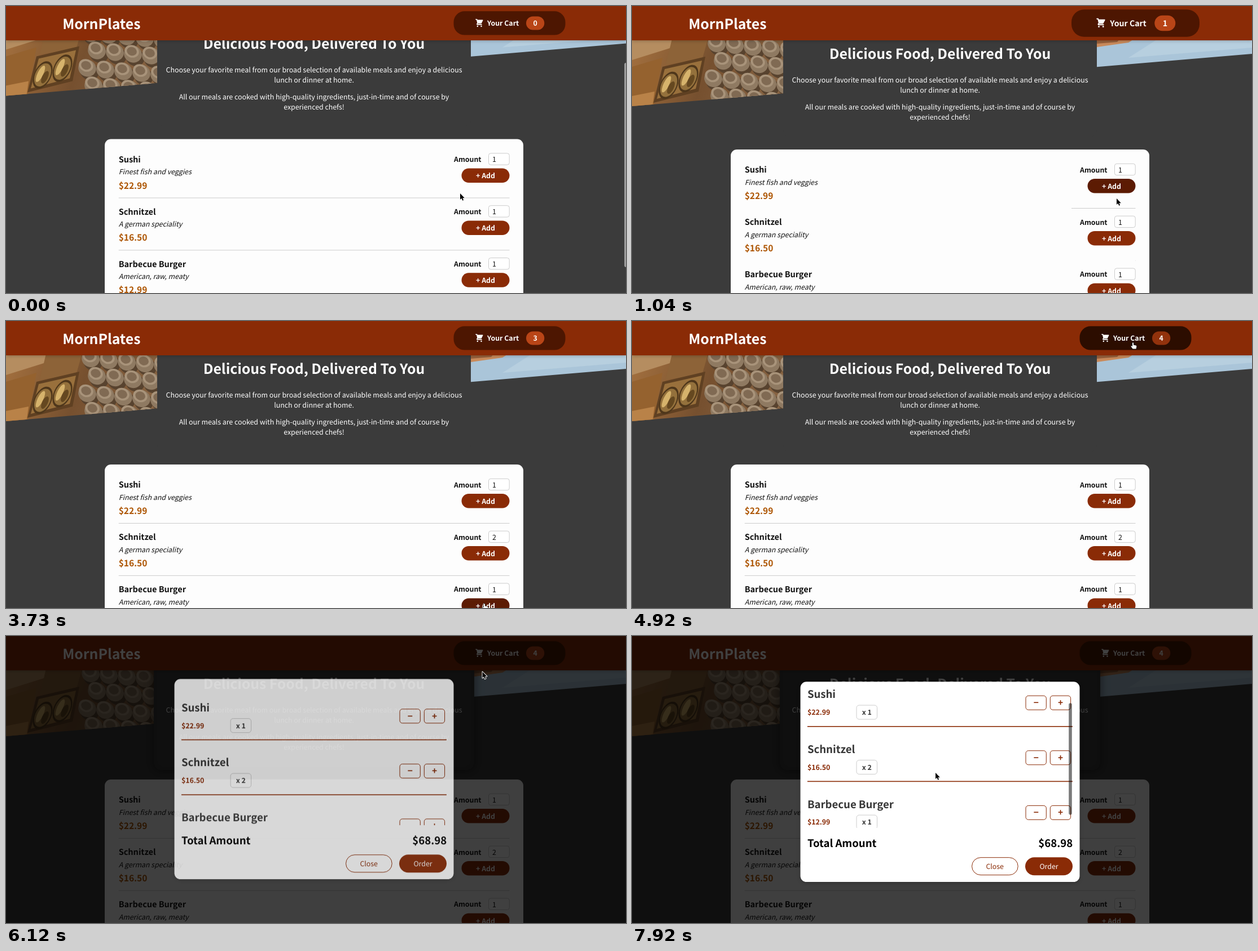
An HTML page with a canvas for the animation above (8000 ms loop, 1099 px wide and 510 px high).

```html
<!DOCTYPE html>
<html lang="en">
<head>
<meta charset="utf-8">
<title>Meal order</title>
<style>
  html, body { margin: 0; width: 100%; height: 100%; overflow: hidden; background: #3b3b3b; }
  canvas { display: block; width: 1099px; height: 510px; }
</style>
</head>
<body>
<canvas id="stage" width="1099" height="510"></canvas>
<script>
const W = 1099, H = 510, LOOP = 8000, TICK = 148.9;
const stage = document.getElementById('stage').getContext('2d');
const layer = new OffscreenCanvas(W, H).getContext('2d');
let ctx = stage;
const FAMILY = '"Noto Sans CJK JP", "Noto Sans CJK SC", "Noto Sans CJK", "Noto Sans", sans-serif';
const REM = 12.37;
const RUST = '#8a2b06', RUST_DARK = '#5c1b03', INK = '#363636', LINE = '#ccc';

const MEALS = [
  { name: 'Sushi', note: 'Finest fish and veggies', price: '$22.99', qty: 1 },
  { name: 'Schnitzel', note: 'A german speciality', price: '$16.50', qty: 2 },
  { name: 'Barbecue Burger', note: 'American, raw, meaty', price: '$12.99', qty: 1 }
];

const CART_ICON = new Path2D('M3 1a1 1 0 000 2h1.2l1.7 6.7-.9.9C3.7 11.8 4.6 14 6.4 14H15a1 1 0 000-2H6.4l1-1H14' +
  'a1 1 0 00.9-.55l3-6A1 1 0 0017 3H6.3L6 1.75A1 1 0 005 1zM16 16.5a1.5 1.5 0 11-3 0 1.5 1.5 0 013 0z' +
  'M6.5 18a1.5 1.5 0 100-3 1.5 1.5 0 000 3z');
const ARROW = new Path2D('M0 0V11L2.5 8.8L4.2 12.8L6.1 12L4.4 8.2H7.9Z');
const HAND = new Path2D('M-1 1Q0-.6 1 1V4.6L5.5 5.6Q6.6 6 6.4 7.4L5.6 11.6H-.4L-3.4 7.4Q-3.6 5.8-2.2 6.2L-1 7.2Z');

// Keyframes: [tick, value, ...]
const SCROLL = [[0, -18.5], [1, -14], [2, -4], [3, 0]];
const LIST = [[47, 0], [48, 4], [51, 4], [52, 15], [53, 28.5]];
const BUMP = [[0, 1], [.1, .9], [.3, 1.1], [.5, 1.146], [1, 1]];
const SLIDE = [[39, 0], [40, .417], [41, .87], [42, 1]];
const FADE = [[39, 0], [40, .18], [41, .8], [42, 1]];
const POINTER = [
  [1, 805, 333], [3, 822, 329], [5, 850, 320], [6, 851, 321], [7, 859, 342], [8, 867, 358],
  [12, 887, 387], [17, 887, 386], [19, 857, 408], [20, 851, 411], [22, 851, 411],
  [25, 848, 502], [29, 848, 502], [31, 868, 250], [33, 888, 38], [40, 889, 37],
  [42, 800, 90], [44, 610, 210], [46, 538, 243]
];

function track(keys, at, i = 1) {
  let a = keys[0];
  for (const b of keys) {
    if (at < b[0]) return b === a ? a[i] : a[i] + (b[i] - a[i]) * (at - a[0]) / (b[0] - a[0]);
    a = b;
  }
  return a[i];
}

const within = (v, a, b) => v >= a && v <= b;

function text(str, x, y, size, color, style = '', align = 'left') {
  ctx.font = `${style} ${size}px ${FAMILY}`;
  ctx.fillStyle = color;
  ctx.textAlign = align;
  ctx.fillText(str, x, y);
}

function box(x, y, w, h, r, fill, stroke, line = 1) {
  ctx.beginPath();
  ctx.roundRect(x, y, w, h, r);
  if (fill) { ctx.fillStyle = fill; ctx.fill(); }
  if (stroke) { ctx.strokeStyle = stroke; ctx.lineWidth = line; ctx.stroke(); }
}

function poly(color, ...pts) {
  ctx.beginPath();
  for (let i = 0; i < pts.length; i += 2) ctx.lineTo(pts[i], pts[i + 1]);
  ctx.closePath();
  ctx.fillStyle = color;
  ctx.fill();
}

function oval(x, y, rx, ry, turn, color) {
  ctx.beginPath();
  ctx.ellipse(x, y, rx, ry, turn, 0, 7);
  ctx.fillStyle = color;
  ctx.fill();
}

function clipped(x, y, w, h, draw) {
  ctx.save();
  ctx.beginPath();
  ctx.rect(x, y, w, h);
  ctx.clip();
  draw();
  ctx.restore();
}

function shadow(color, blur, dy) {
  ctx.shadowColor = color;
  ctx.shadowBlur = blur;
  ctx.shadowOffsetY = dy;
}

function banner() {
  ctx.save();
  ctx.beginPath();
  for (const [x, y] of [[0, 0], [W, 0], [W, 85], [0, 178]]) ctx.lineTo(x, y);
  ctx.clip();
  clipped(0, 0, 268, 200, () => {
    const wood = ctx.createLinearGradient(0, 60, 268, 170);
    wood.addColorStop(0, '#a5713f');
    wood.addColorStop(.5, '#76502f');
    wood.addColorStop(1, '#8a6746');
    ctx.fillStyle = wood;
    ctx.fillRect(0, 0, 268, 200);
    poly('#b58d60', 0, 40, 92, 40, 70, 74, 0, 96);
    poly('#95622f', 0, 108, 54, 92, 38, 180, 0, 180);
    poly('#b98248', 0, 160, 40, 152, 36, 180, 0, 180);
    poly('#8d6338', 72, 54, 136, 54, 124, 96, 60, 104);
    poly('#5f4022', 54, 108, 130, 90, 118, 152, 38, 172);
    poly('#99703c', 58, 112, 124, 97, 113, 147, 44, 165);
    for (const [x, y] of [[65, 141], [100, 129]]) {
      oval(x, y, 15, 26, .45, '#4f371b');
      oval(x, y, 13, 22, .45, '#94713c');
      oval(x - 4, y - 2, 5, 16, .45, '#d6b36c');
      oval(x + 4, y + 4, 5, 12, .45, '#654820');
    }
    for (let row = 0; row < 4; row++) {
      for (let col = 0; col < 5; col++) {
        const x = 150 + col * 32 - row * 3 + row % 2 * 14, y = 64 + row * 31 + col * 3;
        oval(x + 4, y + 9, 17, 15, .4, '#58432f');
        oval(x, y + 3, 16, 15, .4, '#8f7a62');
        oval(x - 2, y - 2, 13, 11, .4, '#a8937a');
        oval(x - 2, y - 2, 9, 7.5, .4, '#806a53');
      }
    }
  });
  clipped(824, 0, 275, 130, () => {
    ctx.fillStyle = '#aac5d9';
    ctx.fillRect(824, 0, 275, 130);
    poly('#b7cfdf', 930, 60, W, 60, W, 74, 880, 92);
    poly('#c98a5b', 824, 40, 920, 40, 880, 65, 824, 73);
    poly('#99603b', 824, 40, 880, 40, 860, 64, 824, 67);
  });
  ctx.restore();
}

function summary(dimmed) {
  if (dimmed) {
    ctx.save();
    shadow('rgba(0,0,0,.5)', 16, 1);
    box(262, 40, 568, 198, 14, '#383838');
    ctx.restore();
  }
  box(268, 40, 556, 192, 11, '#3b3b3b');
  text('Delicious Food, Delivered To You', 546, 94.2, 2 * REM, '#fff', 'bold', 'center');
  const lines = [
    ['Choose your favorite meal from our broad selection of available meals and enjoy a delicious', 136.2],
    ['lunch or dinner at home.', 154],
    ['All our meals are cooked with high-quality ingredients, just-in-time and of course by', 184.2],
    ['experienced chefs!', 202]
  ];
  for (const [line, y] of lines) text(line, 546, y, REM, '#fff', '', 'center');
}

function spinner() {
  box(884, -11, 7, 16, 1.5, '#e4e4e4');
  poly('#555', 885.5, -5, 887.5, -8, 889.5, -5);
  poly('#555', 885.5, -1, 887.5, 2, 889.5, -1);
}

function mealRow(meal, i, k) {
  const hot = [within(k, 5, 7), within(k, 19, 22), within(k, 24, 29)][i];
  const qty = i === 1 && k >= 17 ? 2 : 1;
  ctx.save();
  ctx.translate(0, 291 + i * 92.9);
  text(meal.name, 199.7, 5.3, 1.17 * REM, '#111', 'bold');
  text(meal.note, 199.7, 26.9, REM, '#111', 'italic');
  text(meal.price, 199.7, 52, 1.25 * REM, '#ad5502', 'bold');
  text('Amount', 794, 4.6, REM, '#111', 'bold');
  box(855.5, -10.7, 36.7, 20.4, 3.8, '#fff', LINE);
  text(qty, 862, 4.8, REM, '#111');
  if (i === 1 && within(k, 15, 17)) spinner();
  box(807.5, 16, 85, 25.5, 12.7, hot ? RUST_DARK : RUST);
  text('+ Add', 850, 33.7, REM, '#fff', 'bold', 'center');
  // The rules reappear late after the page has scrolled.
  const partial = within(k, 3, 16);
  const from = partial ? (i ? 893 : 779) : 199.7;
  ctx.fillStyle = LINE;
  ctx.fillRect(from, 68, 892.5 - from, 1);
  ctx.restore();
}

function header(k) {
  ctx.save();
  shadow('rgba(0,0,0,.25)', 6, 1);
  ctx.fillStyle = RUST;
  ctx.fillRect(0, 0, W, 61);
  ctx.restore();
  text('MornPlates', 100.2, 40.7, 2 * REM, '#fff', 'bold');

  const count = k >= 29 ? 4 : k >= 22 ? 3 : k >= 6 ? 1 : 0;
  const start = k >= 29 ? 29 : k >= 22 ? 21.54 : 6;
  const scale = track(BUMP, (k - start) / 2);
  const hover = within(k, 33, 39);
  ctx.save();
  ctx.translate(892.5, 30.5);
  ctx.scale(scale, scale);
  ctx.translate(-892.5, -30.5);
  box(793.5, 9.3, 198, 42.3, 19.3, hover ? '#2c0d00' : '#4d1601');
  ctx.save();
  ctx.translate(830.4, 22.1);
  ctx.scale(.835, .835);
  ctx.fillStyle = '#fff';
  ctx.fill(CART_ICON);
  ctx.restore();
  text('Your Cart', 853, 35.1, REM, '#fff', 'bold');
  box(922, 18.5, 32.3, 24, 12, hover ? '#92320c' : '#b94517');
  text(count, 938.2, 35.1, REM, '#fff', 'bold', 'center');
  ctx.restore();
}

function page(k) {
  const scroll = track(SCROLL, k);
  ctx.fillStyle = '#3b3b3b';
  ctx.fillRect(0, 0, W, H);
  ctx.save();
  ctx.translate(0, scroll);
  banner();
  summary(k >= 40);
  box(175, 255, 742, 400, 11, '#fdfdfd');
  MEALS.forEach((meal, i) => mealRow(meal, i, k));
  ctx.restore();
  if (k <= 3) box(1096, 101 - .75 * (scroll + 18.5), 6, 363, 3, '#9b9b9b');
  header(k);
}

function cartItem(meal, y) {
  text(meal.name, 310.9, y + 6.8, 1.5 * REM, INK, 'bold');
  text(meal.price, 310.9, y + 36.7, REM, RUST, 'bold');
  box(398, y + 19.5, 36.5, 25, 4.6, null, LINE);
  text('x ' + meal.qty, 416.2, y + 36.7, REM, INK, 'bold', 'center');
  ['−', '+'].forEach((sign, n) => {
    const x = 698 + n * 43.3;
    box(x, y + 2.7, 36.3, 25, 4.6, null, RUST);
    text(sign, x + 18.2, y + 20.5, 1.25 * REM, RUST, 'bold', 'center');
  });
  ctx.fillStyle = RUST;
  ctx.fillRect(310.9, y + 56.5, 470, 1.6);
}

function modal(k) {
  const scroll = track(LIST, k);
  ctx.save();
  shadow('rgba(0,0,0,.25)', 6, 1.5);
  box(298.5, 81.3, 495, 355.8, 10.8, '#fff');
  ctx.restore();
  clipped(300, 94, 492, 247.3, () => {
    MEALS.forEach((meal, i) => cartItem(meal, 132 + i * 97.6 - scroll));
    if (k >= 47) box(774.2, 95.5 + scroll * .83, 5.6, 198.5, 2.8, 'rgba(0,0,0,.52)');
  });
  text('Total Amount', 310.9, 375, 1.5 * REM, '#000', 'bold');
  text('$68.98', 781.1, 375, 1.5 * REM, '#000', 'bold', 'right');
  box(602.5, 393.7, 81.7, 31, 15.5, null, RUST);
  text('Close', 643.2, 414, REM, RUST, '', 'center');
  box(697, 393.2, 84, 32, 16, RUST);
  text('Order', 739, 414, REM, '#fff', '', 'center');
}

// The dialog is painted on its own layer so that it fades as one piece.
function overlay(k) {
  ctx.fillStyle = 'rgba(0,0,0,.75)';
  ctx.fillRect(0, 0, W, H);
  ctx = layer;
  ctx.clearRect(0, 0, W, H);
  modal(k);
  ctx = stage;
  ctx.globalAlpha = track(FADE, k);
  ctx.drawImage(layer.canvas, 0, -37.1 * (1 - track(SLIDE, k)));
  ctx.globalAlpha = 1;
}

function pointer(k) {
  const hand = within(k, 5, 6) || within(k, 19, 22) || within(k, 24, 29) || within(k, 33, 39);
  ctx.save();
  ctx.translate(track(POINTER, k), track(POINTER, k, 2));
  ctx.lineJoin = 'round';
  ctx.lineWidth = hand ? 1.2 : 1.8;
  ctx.strokeStyle = hand ? '#000' : '#fff';
  ctx.fillStyle = hand ? '#fff' : '#000';
  const shape = hand ? HAND : ARROW;
  ctx.stroke(shape);
  ctx.fill(shape);
  ctx.restore();
}

function draw(now) {
  const k = Math.floor((now % LOOP + 3) / TICK);
  page(k);
  if (k >= 40) overlay(k);
  pointer(k);
}

for (const c of [stage, layer]) c.textRendering = 'geometricPrecision';
const begin = performance.now();
function loop() {
  draw(performance.now() - begin);
  requestAnimationFrame(loop);
}
loop();
</script>
</body>
</html>
```
